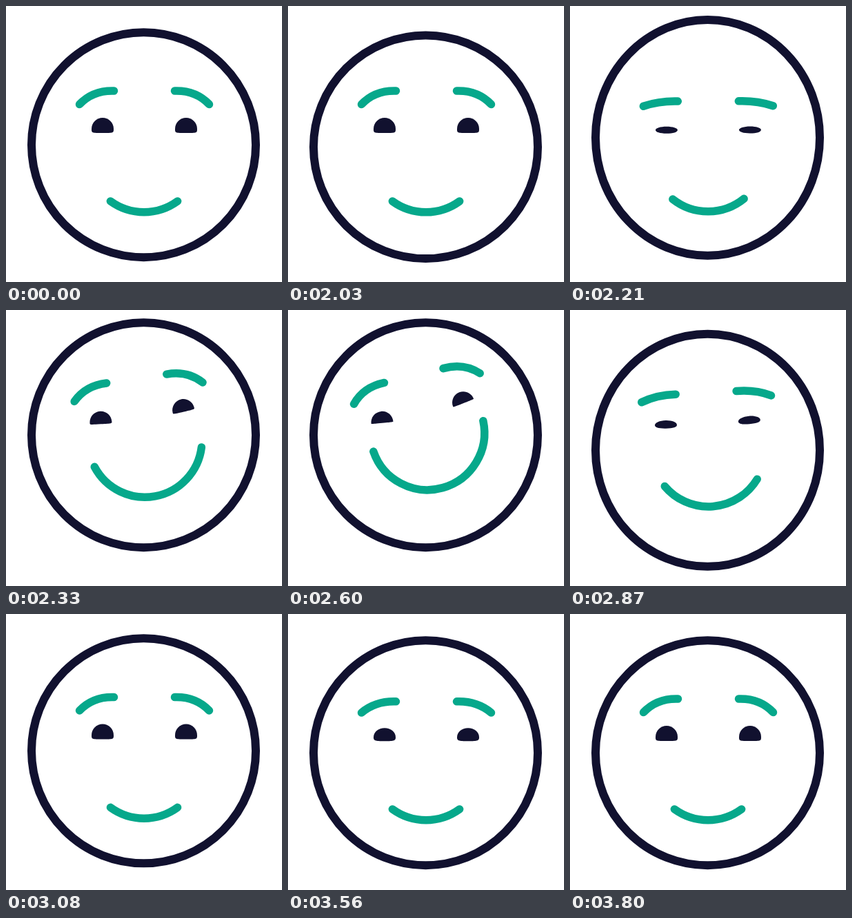
Write an HTML page that moves like this. It is 400 px wide and 400 px high and loops after 3830 ms.

```html
<!DOCTYPE html>
<html lang="en">
<head>
<meta charset="utf-8">
<title>Smiling face</title>
<style>
  html, body { margin: 0; width: 100%; height: 100%; overflow: hidden; background: #fff; }
  svg { display: block; width: 100%; height: 100%; }
  .line { fill: none; stroke: #06a88b; stroke-width: 11.5; stroke-linecap: round; }
  .eye { fill: #11112f; }
  #face { fill: #fff; stroke: #11112f; stroke-width: 12; }
</style>
</head>
<body>
<svg viewBox="0 0 400 400">
  <ellipse id="face" cx="199.5" rx="162.5"/>
  <g id="upper">
    <path class="line brow"/>
    <path class="line brow" transform="translate(401 0) scale(-1 1)"/>
    <path class="eye"/>
    <path class="eye"/>
  </g>
  <path id="mouth" class="line"/>
</svg>
<script>
const LOOP = 3830, JUMP = 2000, STEP = 30, OFFSET = 20;
const MOUTH_RADIUS = 82.7;

const $ = selector => [...document.querySelectorAll(selector)];
const [face] = $('#face'), [upper] = $('#upper'), [mouth] = $('#mouth');
const brows = $('.brow'), eyes = $('.eye');

const mix = (a, b, p) => a + (b - a) * p;

function ease(t, from, to) {
  const p = Math.min(1, Math.max(0, (t - from) / (to - from)));
  return p * p * (3 - 2 * p);
}

// 0 to 1 to 0, staying at 1 between the two eased moves
const hold = (t, from, full, leave, end) => ease(t, from, full) - ease(t, leave, end);
const pulse = (t, from, peak, end) => hold(t, from, peak, peak, end);
const blink = (t, start) => hold(t, start, start + 120, start + 150, start + 270);

function browPath(closed) {
  const y = (open, shut) => mix(open, shut, closed);
  return `M106.5 ${y(142.5, 144.8)}Q${y(126, 130)} ${y(122, 137)} 156.5 ${y(123, 137.8)}`;
}

// The flat lower edge turns round as the lid closes; a smile raises it.
function eyePath(closed, smile) {
  const r = 16, k = 0.55;
  const side = 1.5 * closed;
  const top = mix(-16, -3.5, closed), bottom = mix(6 - 5 * smile, 6.5, closed);
  const square = mix(1, 0.6, closed);
  const high = mix(side, top, k), low = mix(side, bottom, square);
  return `M${-r} ${side}C${-r} ${high} ${-r * k} ${top} 0 ${top}` +
    `C${r * k} ${top} ${r} ${high} ${r} ${side}` +
    `C${r} ${low} ${r * square} ${bottom} 0 ${bottom}` +
    `C${-r * square} ${bottom} ${-r} ${low} ${-r} ${side}Z`;
}

function mouthPath(cx, cy, tilt, half) {
  const point = deg => {
    const a = deg * Math.PI / 180;
    return `${cx + MOUTH_RADIUS * Math.cos(a)} ${cy + MOUTH_RADIUS * Math.sin(a)}`;
  };
  const middle = 90 + tilt;
  return `M${point(middle + half)}A${MOUTH_RADIUS} ${MOUTH_RADIUS} 0 0 0 ${point(middle - half)}`;
}

function drawFace(t) {
  const crouch = 13 * pulse(t, 10, 105, 210);
  const rise = -20 * hold(t, 105, 330, 640, 945);
  const landing = 11 * pulse(t, 830, 945, 1060) - 3 * pulse(t, 945, 1080, 1200);
  const squash = 5 * pulse(t, 10, 105, 190) + 4 * pulse(t, 870, 950, 1080);
  const stretch = 8 * pulse(t, 105, 210, 345) + 6 * pulse(t, 700, 870, 945);
  face.setAttribute('cy', 201.2 + crouch + rise + landing);
  face.setAttribute('ry', 163 - squash + stretch);
}

function drawFeatures(t) {
  const smile = hold(t, 198, 430, 620, 1020);
  const opening = smile ** 0.8;
  const closed = blink(t, 75) + blink(t, 790) + blink(t, 1530);
  const crouch = 5 * pulse(t, 30, 150, 250);
  const rebound = -2.6 * pulse(t, 1000, 1080, 1200);
  const shift = 0.4 * crouch - 30 * hold(t, 210, 390, 720, 1050) + rebound;
  const tilt = -13.7 * smile ** 1.2;

  upper.setAttribute('transform', `translate(0 ${shift}) rotate(${tilt} 200 200)`);
  brows.forEach(brow => brow.setAttribute('d', browPath(closed)));
  eyes.forEach((eye, i) => {
    const side = i ? 1 : -1;
    eye.setAttribute('d', eyePath(closed, smile));
    eye.setAttribute('transform',
      `translate(${200.5 + side * 60.5} 178) rotate(${side * tilt * 0.58})`);
  });
  mouth.setAttribute('d', mouthPath(200 + 2 * smile, 216 + crouch - 38 * opening + rebound,
    -15.6 * smile, 36 + 50.5 * opening));
}

function draw(time) {
  const t = Math.floor((time - OFFSET) / STEP) * STEP + OFFSET - JUMP + 10;
  drawFace(t);
  drawFeatures(t);
}

const begin = performance.now();
function tick() {
  draw((performance.now() - begin) % LOOP);
  requestAnimationFrame(tick);
}
tick();
</script>
</body>
</html>
```
